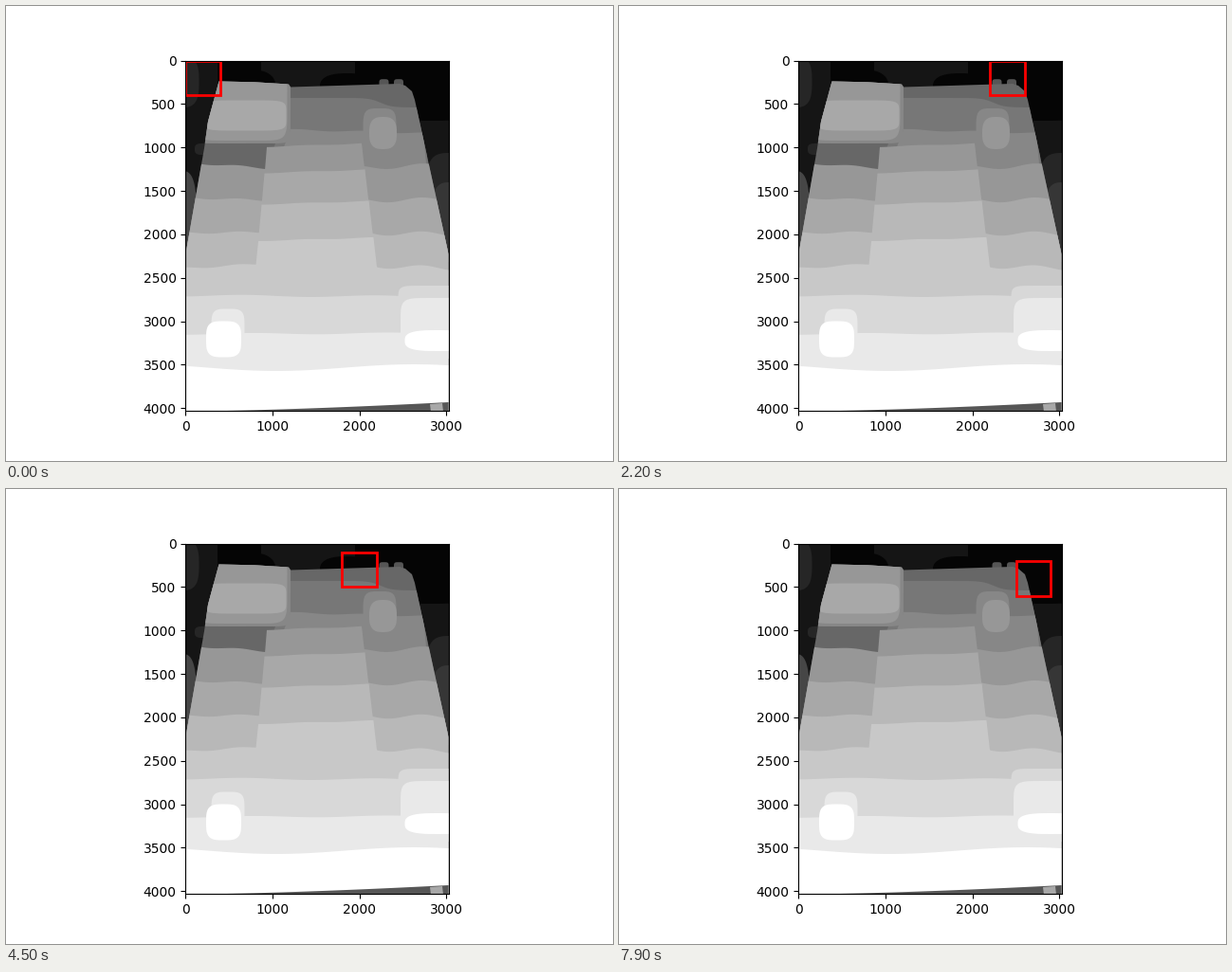
Write a matplotlib script that moves like this. It is 640 by 480 pixels and loops after 8 s.

```python
import numpy as np
import matplotlib.pyplot as plt
from matplotlib.animation import FuncAnimation
from matplotlib.patches import Polygon, Rectangle
from matplotlib.transforms import Affine2D

W, H = 640, 480
IMG_W, IMG_H = 3024, 4032
WINDOW, STEP, COLS = 400, 100, 27
FRAMES, INTERVAL = 80, 100
LEFT, RIGHT, BOTTOM = 189.4, 466.6, 427.2

fig, ax = plt.subplots(figsize=(W / 100, H / 100), dpi=100)
ax.set_aspect("equal")
ax.set_xlim(-0.5, IMG_W - 0.5)
ax.set_ylim(IMG_H - 0.5, -0.5)
ax.set_xticks(range(0, 3001, 1000))
ax.set_yticks(range(0, 4001, 500))

# Shapes are placed in stage pixels, measured from the top left corner
stage = Affine2D().scale(1, -1).translate(0, H)


def fill(level, pts, clip=None):
    """Paint an outline in one of 16 even steps of gray."""
    tone = 1 if level >= 15 else (5 + 16.25 * level) / 255
    shape = ax.add_patch(Polygon(pts, transform=stage, facecolor=str(tone),
                                 edgecolor="none"))
    if clip is not None:
        shape.set_clip_path(clip)
    return shape


def oval(level, cx, cy, rx, ry, power=3, clip=None):
    """Superellipse; a higher power gives squarer corners."""
    a = np.linspace(0, 2 * np.pi, 120)
    c, s = np.cos(a), np.sin(a)
    x = cx + rx * np.sign(c) * abs(c) ** (2 / power)
    y = cy + ry * np.sign(s) * abs(s) ** (2 / power)
    return fill(level, np.column_stack([x, y]), clip)


def ripple(x0, x1, y0, y1, amp=0.8, period=70, peak=0):
    """Sloping line with a gentle wave on it."""
    x = np.linspace(x0, x1, 60)
    y = np.linspace(y0, y1, 60)
    return np.column_stack(
        [x, y + amp * np.cos(2 * np.pi * (x - peak) / period)])


def band(level, *parts):
    """Fill everything on the body below a profile."""
    top = np.vstack(parts)
    fill(level, np.vstack([top, [(RIGHT, BOTTOM), (LEFT, BOTTOM)]]), body)


# Dark surroundings
fill(1, [(LEFT, 50), (RIGHT, 50), (RIGHT, BOTTOM), (LEFT, BOTTOM)])
oval(2, 185, 80, 18.5, 27)
oval(0, 246, 60, 23, 35, 5)
oval(0, 265, 83, 19, 15, 2)
oval(0, 430, 73, 62, 48, 6)
oval(0, 360, 85, 29, 14, 2.5)
oval(2, 207, 151, 8, 6)
oval(4, 185, 225, 16, 51)
oval(2, 468, 185, 24, 30)
oval(3, 468, 228, 20, 42)
for x in (398.5, 414):
    oval(5, x, 82, 5, 4.8, 4)

# Body outline
body = fill(6, [(224.5, 79.5), (262, 80.3), (298, 82.5), (300, 85.5),
                (415, 82), (421, 84), (428, 90), (431, 99), (RIGHT, 262),
                (RIGHT, BOTTOM), (LEFT, BOTTOM), (LEFT, 262), (209, 150),
                (213, 122)])

# Far bands and the panel at the upper left
x = np.linspace(300, 440, 80)
band(7, np.column_stack([x, 97 + 10 / (1 + np.exp((395 - x) / 6))]))
band(8, ripple(300, 440, 130.5, 134, peak=412))
oval(8, 250, 100, 50, 45, 12, body)
oval(9, 248, 90, 48.5, 52, 8, body)
oval(10, 252, 115.5, 43.5, 16, 6, body)

# Round feature at the upper right
oval(8, 394, 130, 17.5, 22, 4, body)
oval(9, 397.5, 134, 14.5, 17, 2.8, body)


def inner(y):
    return 275 - 0.09 * (y - 147)


def outer(y):
    return 375 + 0.125 * (y - 147)


# Stepped bands: a raised centre between two slanting walls
for k in range(4):
    mid = 147 + 25 * k + 2.7 * k * k
    left = 168 + 35.5 * k
    right = 169 + 35.5 * k
    tilt = 3 - 1.7 * k
    band(9 + k,
         ripple(LEFT, inner(left), left - tilt, left + tilt, 1, 60, 215),
         ripple(inner(mid), outer(mid), mid + 1.5, mid - 2, 0.4),
         ripple(outer(right), RIGHT, right + tilt / 2, right - tilt / 2,
                2.3, 70, 403))

# Near bands, each with its humps
band(13, ripple(LEFT, RIGHT, 305.5, 306.5, 1, 140, 320))
oval(13, 455, 320, 41.5, 25, 8, body)
band(14, ripple(LEFT, RIGHT, 346, 345, 0.8, 140, 330))
oval(14, 234, 340, 17.5, 20.5, 4, body)
oval(14, 455, 340, 39, 32, 6, body)
band(15, ripple(LEFT, RIGHT, 381.5, 381.5, 3.5, 290, 285))
oval(15, 229.5, 351.5, 18.5, 19, 3.5, body)
oval(15, 455, 353, 34.5, 11, 3, body)

# Ground strip along the lower edge
t = np.linspace(0, 1, 60)
rise = np.column_stack([LEFT + (RIGHT - LEFT) * t, 427.6 - 9.6 * t ** 1.5])
fill(5, np.vstack([rise, [(RIGHT, 430), (LEFT, 430)]]))
fill(10, [(447, 420), (460, 419), (461, 428), (448, 428)])

box = ax.add_patch(Rectangle((0, 0), WINDOW, WINDOW, linewidth=2,
                             edgecolor="red", facecolor="none"))


def update(i):
    row, col = divmod(i, COLS)
    box.set_xy((col * STEP, row * STEP))
    return (box,)


anim = FuncAnimation(fig, update, frames=FRAMES, interval=INTERVAL,
                     repeat=True, repeat_delay=0)
plt.show()
```
